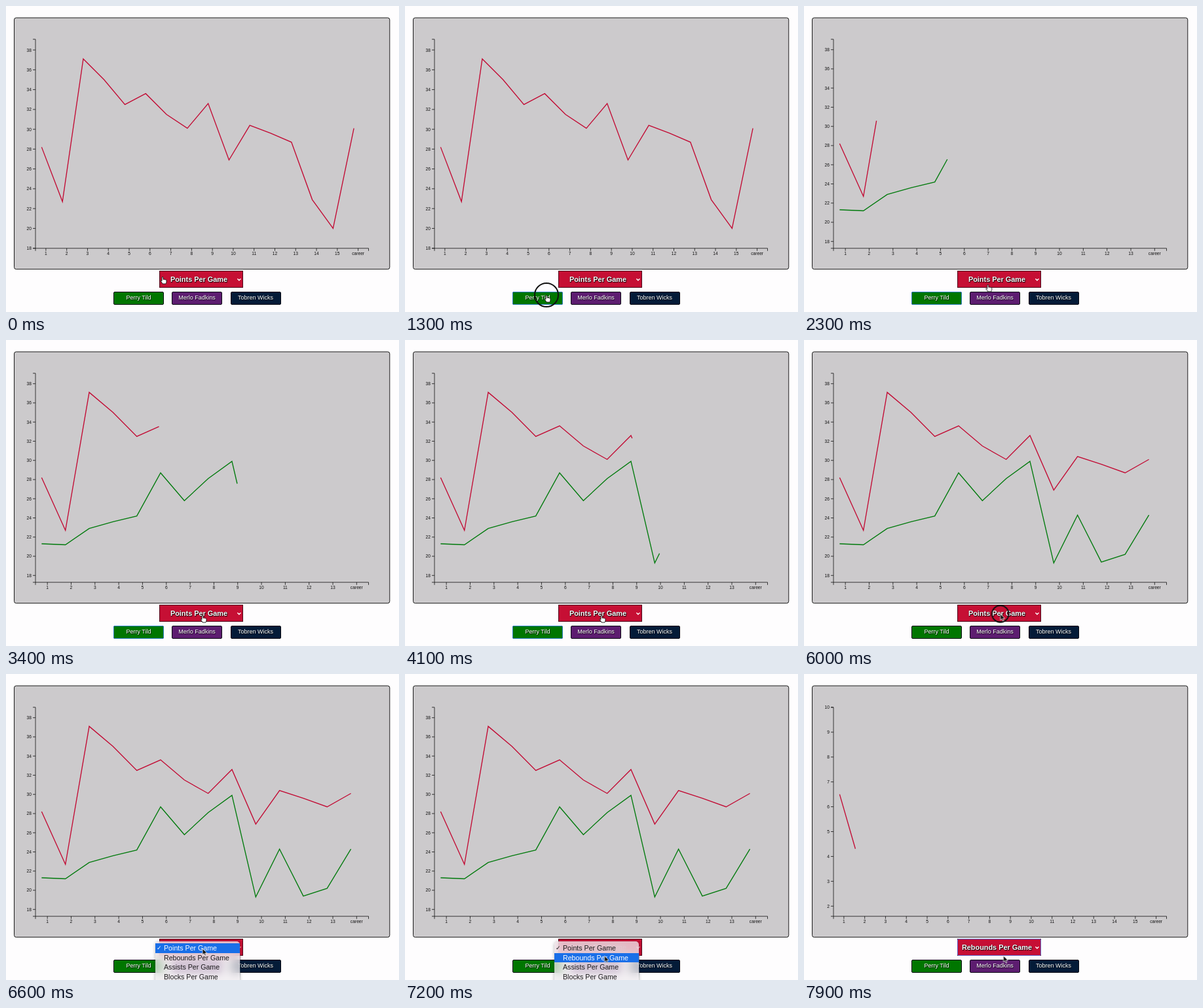
These frames come from a looping animation (600 px wide and 467 px high, 8 s). An HTML page:

```html
<!DOCTYPE html>
<html lang="en">
<head>
<meta charset="utf-8">
<title>Season averages</title>
<style>
  html, body { margin: 0; width: 100%; height: 100%; overflow: hidden; background: #fefdfe; }
  body { position: relative; font-family: "Liberation Sans", Arial, sans-serif; }
  svg { position: absolute; left: 0; top: 0; }

  /* Charts */
  .axis { fill: none; stroke: #111; stroke-width: .8; }
  .label { font-size: 6.7px; fill: #111; }
  .line { fill: none; stroke-width: 1.35; }
  .draw { stroke-dasharray: 1.001 2; animation: 8s linear infinite; }
  #duo .draw { animation-name: draw-duo; }
  #rebounds .draw { animation-name: draw-rebounds; }

  /* Controls */
  .box { position: absolute; box-sizing: border-box; color: #fff; text-align: center; }
  .button { top: 436px; width: 77px; height: 19.5px; border: 1px solid #0a0a12; border-radius: 2px;
    font-size: 9px; line-height: 17.5px; text-shadow: .5px .5px 1px #000; }
  .select { left: 234px; top: 404px; width: 128px; height: 26px; border: 1.3px solid #4c0a1c;
    background: #c60f34; }
  .choice { left: 234px; top: 404px; width: 121px; font: bold 10.9px/26px "Liberation Sans", Arial, sans-serif;
    text-shadow: 0 0 1px #000, .7px .7px 1px #000; }
  .focus { border: 1.4px solid #2d7fc4; border-radius: 2px; }

  /* Popup */
  #menu { position: absolute; left: 227.5px; top: 408px; width: 129.5px; height: 80px; padding-top: 3px;
    box-sizing: border-box; border-radius: 5px; background: rgba(240, 236, 240, .76);
    backdrop-filter: blur(7px); box-shadow: 0 1px 5px rgba(0, 0, 0, .3);
    font-size: 10.65px; line-height: 14.65px; color: #1c1a1c; animation: menu 8s linear infinite; }
  #menu div { position: relative; height: 14.65px; padding-left: 13.5px; white-space: nowrap; }
  #menu i { position: absolute; left: 2.5px; font: 9px/14.65px "DejaVu Sans", sans-serif; }

  /* Pointer */
  #pointer { animation: travel 8s ease-in-out infinite; }
  #ring { fill: none; animation: ring 8s linear infinite; }

  .step { animation: var(--k) 8s step-end infinite; }

  @keyframes early { 0% { opacity: 1 } 16.625% { opacity: 0 } }
  @keyframes middle { 0% { opacity: 0 } 16.625% { opacity: 1 } 92.725% { opacity: 0 } }
  @keyframes late { 0% { opacity: 0 } 92.725% { opacity: 1 } }
  @keyframes before-late { 0% { opacity: 1 } 92.725% { opacity: 0 } }
  @keyframes focused { 0% { opacity: 0 } 9.75% { opacity: 1 } 74.375% { opacity: 0 } }

  @keyframes draw-duo {
    0%, 16.625% { stroke-dashoffset: 1.001 }
    67.125%, 100% { stroke-dashoffset: 0 }
  }
  @keyframes draw-rebounds {
    0%, 92.725% { stroke-dashoffset: 1.001 }
    100% { stroke-dashoffset: .857 }
  }

  @keyframes menu {
    0%, 76.24% { opacity: 0 }
    76.25%, 91.5% { opacity: 1 }
    92.7%, 100% { opacity: 0 }
  }
  @keyframes hot-first {
    0% { background: #1a6fe8; color: #fff }
    84.75% { background: transparent; color: #1c1a1c }
  }
  @keyframes hot-second {
    0% { background: transparent; color: #1c1a1c }
    84.75% { background: #1a6fe8; color: #fff }
  }

  @keyframes travel {
    0%, 1.25% { transform: translate(239px, 413px) }
    10.6%, 21.25% { transform: translate(216px, 441px) }
    32.5%, 72.5% { transform: translate(300px, 420px) }
    74.375%, 81.25% { transform: translate(299.7px, 418px) }
    87.5%, 100% { transform: translate(304.5px, 430px) }
  }
  @keyframes hand {
    0% { opacity: 1 } 6.4% { opacity: 0 } 7.6% { opacity: 1 }
    24.9% { opacity: 0 } 27% { opacity: 1 } 74.375% { opacity: 0 }
  }
  @keyframes arrow {
    0% { opacity: 0 } 6.4% { opacity: 1 } 7.6% { opacity: 0 }
    24.9% { opacity: 1 } 27% { opacity: 0 } 74.375% { opacity: 1 }
  }
  @keyframes ring {
    0%, 9.74% { r: 9px; opacity: 0 }
    9.75% { r: 9px; opacity: 1 }
    11.25%, 16.75% { r: 18px; opacity: 1 }
    18.1% { r: 18px; opacity: 0 }
    18.2%, 74.37% { r: 9px; opacity: 0 }
    74.375% { r: 9px; opacity: 1 }
    75.875%, 77.5% { r: 18px; opacity: 1 }
    78.5%, 100% { r: 18px; opacity: 0 }
  }
</style>
</head>
<body>
<svg width="600" height="467">
  <rect x="12.5" y="18" width="573.3" height="383.7" rx="3" fill="#cccacc" stroke="#1a1a1a"/>
  <g id="solo" class="step" style="--k: early"></g>
  <g id="duo" class="step" style="--k: middle"></g>
  <g id="rebounds" class="step" style="--k: late"></g>
</svg>

<div class="box select"></div>
<div class="box select step" style="--k: late; border-color: #5a5fc4; background: none; border-radius: 2px"></div>
<div class="box choice step" style="--k: before-late">Points Per Game</div>
<div class="box choice step" style="--k: late">Rebounds Per Game</div>
<svg width="600" height="467">
  <path d="M353.4 416.2l2.5 2.6 2.5-2.6" fill="none" stroke="#fff" stroke-width="1.4"/>
</svg>

<div class="box button" style="left: 164px; background: #007600">Perry Tild</div>
<div class="box button focus step" style="left: 164px; --k: focused; border: 1.4px solid #2d7fc4"></div>
<div class="box button" style="left: 253px; background: #5d1d70">Merlo Fadkins</div>
<div class="box button" style="left: 342.5px; background: #041b38">Tobren Wicks</div>

<div id="menu">
  <div class="step" style="--k: hot-first"><i>✓</i>Points Per Game</div>
  <div class="step" style="--k: hot-second">Rebounds Per Game</div>
  <div>Assists Per Game</div>
  <div>Blocks Per Game</div>
</div>

<svg width="600" height="467">
  <g id="pointer">
    <circle id="ring" r="9" stroke="#111" stroke-width="2"/>
    <path class="step" style="--k: hand" fill="#fff" stroke="#111" stroke-width=".9" stroke-linejoin="round"
      d="M-1 1Q0-.6 1 1V4.4Q2 3.4 2.8 4.4Q4 3.8 4.4 4.9Q5.8 4.4 6 5.8V8Q5.8 9.5 5 11H0Q-.6 9.4-3 6.6Q-3 5.2-1 6.6Z"/>
    <path class="step" style="--k: arrow" fill="#111" stroke="#fff" stroke-width=".7"
      d="M0 0V9.5L2.2 7.5 3.7 11 5.2 10.3 3.8 7H6.8Z"/>
  </g>
</svg>

<script>
  const LEFT = 45, RIGHT = 553.5, TOP = 50.8, BOTTOM = 369.8;
  const RED = "#c20a33", GREEN = "#007a0c";

  const opening = [28.2, 22.7, 37.1, 35, 32.5, 33.6, 31.5, 30.1, 32.6, 26.9, 30.4, 29.6, 28.7];
  const redPoints = [...opening, 22.9, 20, 30.1];
  const redShort = [...opening, 30.1];
  const greenPoints = [21.3, 21.2, 22.9, 23.6, 24.2, 28.7, 25.8, 28.1, 29.9, 19.3, 24.3, 19.4, 20.2, 24.3];
  const redRebounds = [6.5, 3.6, 5.2, 5.5, 8, 6.9, 6, 6.4, 6.7, 6.9, 6.6, 5.9, 5.8, 5.7, 6.1, 6.2];

  function add(parent, tag, attrs, text = "") {
    const el = document.createElementNS("http://www.w3.org/2000/svg", tag);
    for (const key in attrs) el.setAttribute(key, attrs[key]);
    el.textContent = text;
    parent.append(el);
  }

  // base: y of the lowest tick; unit: pixels per value
  function chart(id, { low, high, by, base, unit, lines, drawn }) {
    const g = document.getElementById(id);
    const count = lines[0].values.length;
    const band = (RIGHT - LEFT) / count;
    const yOf = v => base - (v - low) * unit;

    let axes = `M${LEFT - 4} ${TOP}H${LEFT}V${BOTTOM}H${LEFT - 4}` +
      `M${LEFT} ${BOTTOM + 4}V${BOTTOM}H${RIGHT}V${BOTTOM + 4}`;
    for (let v = low; v <= high; v += by) {
      axes += `M${LEFT - 4} ${yOf(v)}H${LEFT}`;
      add(g, "text", { class: "label", x: 39, y: yOf(v) + 2.4, "text-anchor": "end" }, v);
    }
    for (let i = 0; i < count; i++) {
      const x = LEFT + band * (i + .5);
      axes += `M${x} ${BOTTOM}v4`;
      add(g, "text", { class: "label", x, y: 380, "text-anchor": "middle" }, i < count - 1 ? i + 1 : "career");
    }
    add(g, "path", { class: "axis", d: axes });

    for (const { values, color } of lines) {
      const d = "M" + values.map((v, i) => `${54.4 + band * i} ${yOf(v)}`).join("L");
      add(g, "path", { class: drawn ? "line draw" : "line", d, stroke: color, pathLength: 1 });
    }
  }

  chart("solo", { low: 18, high: 38, by: 2, base: 369.7, unit: 15.13,
    lines: [{ values: redPoints, color: RED }] });
  chart("duo", { low: 18, high: 38, by: 2, base: 359.3, unit: 14.63, drawn: true,
    lines: [{ values: redShort, color: RED }, { values: greenPoints, color: GREEN }] });
  chart("rebounds", { low: 2, high: 10, by: 1, base: 354.3, unit: 37.93, drawn: true,
    lines: [{ values: redRebounds, color: RED }] });
</script>
</body>
</html>
```
